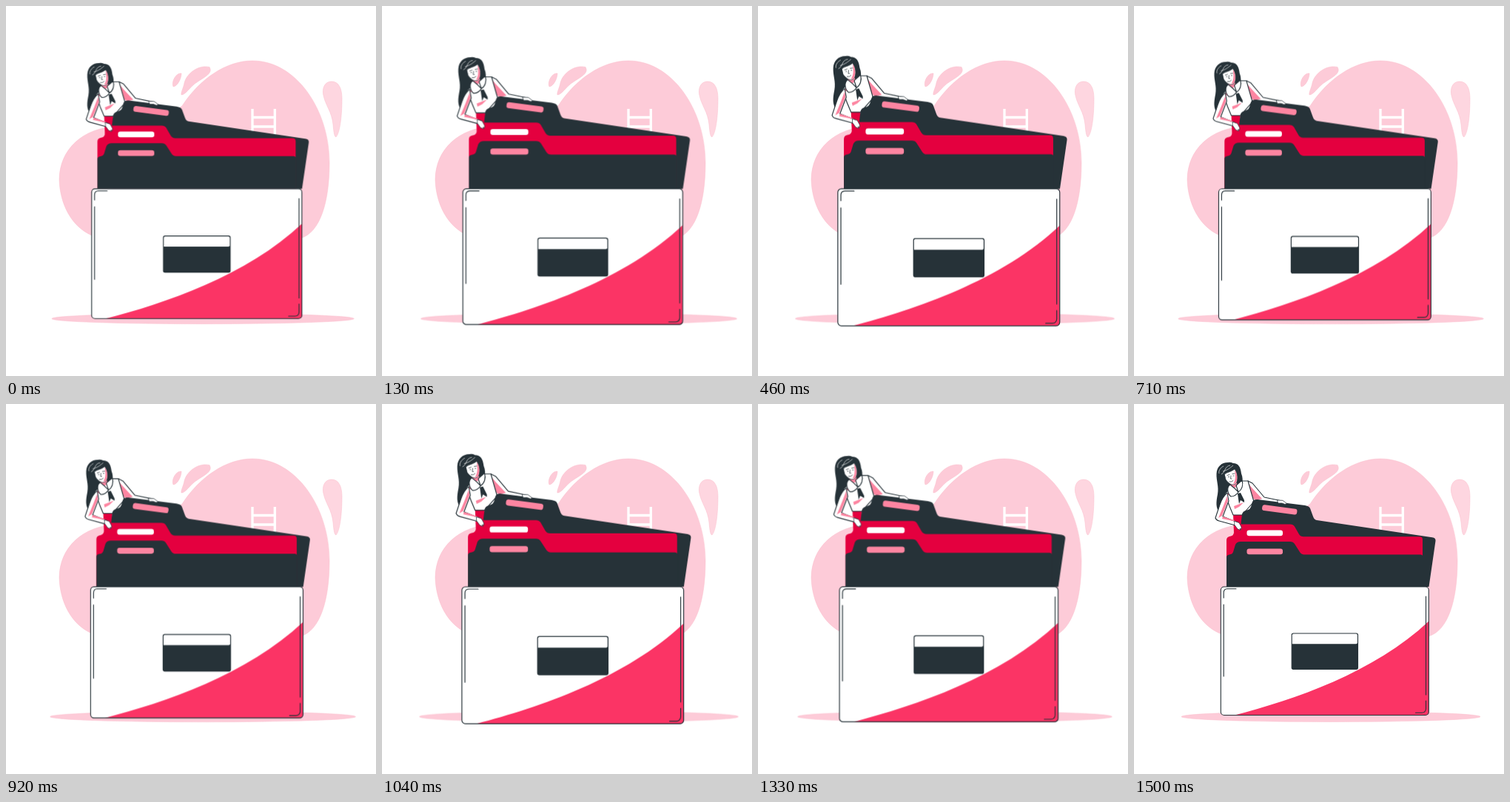
Recreate the animation shown at these times as an HTML page. Size 500 by 500 pixels, loop 1.54 s.

```html
<!DOCTYPE html>
<html lang="en">
<head>
<meta charset="utf-8">
<title>Folder pulse</title>
<style>
  html, body { margin: 0; width: 100%; height: 100%; overflow: hidden; background: #fff; }
  svg { display: block; width: 100%; height: 100%; }

  .pulse { animation: pulse 1540ms linear infinite; }
  .files { transform-origin: 257.75px 247px; }
  .ground { transform-origin: 266px 422.5px; }

  @keyframes pulse {
    0%     { transform: scale(1.0107); }
    8.44%  { transform: scale(1.057); animation-timing-function: cubic-bezier(.39, .575, .565, 1); }
    19.9%  { transform: scale(1.1); animation-timing-function: cubic-bezier(.47, 0, .745, .715); }
    29.87% { transform: scale(1.0675); }
    46.1%  { transform: scale(1.0213); animation-timing-function: cubic-bezier(.39, .575, .565, 1); }
    52.9%  { transform: scale(1); animation-timing-function: cubic-bezier(.47, 0, .745, .715); }
    59.74% { transform: scale(1.0213); }
    70.1%  { transform: scale(1.081); animation-timing-function: cubic-bezier(.39, .575, .565, 1); }
    75.97% { transform: scale(1.0995); animation-timing-function: cubic-bezier(.445, .05, .55, .95); }
    97.4%  { transform: scale(1); animation-timing-function: cubic-bezier(.47, 0, .745, .715); }
    100%   { transform: scale(1.0107); }
  }

  .blush { fill: #fdcbd8; stroke: #fbbccb; stroke-width: .5; }
  .pale { fill: #fed6e0; }
  .dark { fill: #263238; }
  .red { fill: #e4003f; }
  .pink { fill: #fb3465; }
  .tab { fill: #fd85a1; }
  .white { fill: #fff; }
  .line { stroke: #263238; stroke-width: 1.1; stroke-linecap: round; stroke-linejoin: round; }
  .thin { stroke: #263238; stroke-width: .7; stroke-linecap: round; stroke-linejoin: round; }
  .none { fill: none; }
</style>
</head>
<body>
<svg viewBox="0 0 500 500">
  <!-- backdrop -->
  <path class="blush" d="M150 163C104 164 72 194 72 235C73 267 88 298 116 310L240 330L398 314C425 306 437 264 437 212C437 140 392 74 333 74C298 74 262 98 238 135L190 170Z"/>
  <g class="blush">
    <path d="M237 91C230 90 223 102 226 109C231 109 237 99 237 91Z"/>
    <path d="M275 82.500C260 79 244 91 241 104C240 110 236 117 237 120C242 120 246 113 254 106C264 98 278 93 276 85Z"/>
    <path class="pale" d="M440 102C430 102 427 112 429 121C432 135 440 142 442 160C443 172 444 177 446 177C451 172 454 150 454 125C454 112 450 102 440 102Z"/>
  </g>
  <path class="none" stroke="#fff" stroke-width="3.300" d="M333 139V195M363.300 139V195M333 150.500H363M333 163H363"/>

  <ellipse class="blush pulse ground" cx="266" cy="422.500" rx="202" ry="7"/>

  <g class="pulse files">
    <!-- woman -->
    <path class="red" d="M134 148L146 145V168L135 174Z"/>
    <path class="dark" d="M127 79C118 79 112 85 111.500 94C111 104 115 111 113 122C111 132 110 141 116 147C122 141 122 130 126 119L146 108C147 103 147 99 145 94C144 85 141 80 134 80Q130 78 127 79Z"/>
    <path class="white line" d="M154 104L160 107L176 126L200 131L199 136L168 133L157 128Z"/>
    <path class="tab" d="M155 108L160 114L173 128L165 130L158 126Z"/>
    <path class="white line" d="M130 114L123 121L129 138L134 150H146L162 132L154 104L146 104Z"/>
    <path class="tab" d="M135 138L148 133L142 139L136 142ZM128 117L133 124L126 123Z"/>
    <path class="white line" d="M126 120C121 124 118 130 116 136L110 154Q111 157 115 158L137 164L140 160L120 152L128 131Z"/>
    <path class="tab" d="M126 124L127 131L119 151L114 154L121 137ZM120 152L135 157L138 159L119 155Z"/>
    <path class="tab" d="M128 104L138 103L140 111L133 115Z"/>
    <path class="white thin" d="M122.500 95C125 92 131 92 136 88C140 93 141 102 138 107C134 112 127 107 124 102Z"/>
    <path class="tab" d="M136 89C140 94 140.500 103 137 107.500L134 108C138 102 137 96 136 89Z"/>
    <path class="none thin" d="M126 96.500L129 95.500M133 94.500L136 94M131 97L130.500 101H132M129 105Q132 106 134 103.500M127.500 98.500H128.500M134 97H135"/>
    <path class="none" stroke="#fff" stroke-width=".6" d="M130 83C122 84 124 92 118 95M134 83C129 87 127 89 120 91M115 94C114 90 117 86 121 84"/>
    <path class="white line" d="M130 109C125 112 126 121 131 125C136 125 139 122 141 119L136 114ZM141 119C146 116 148 109 146 103L138 110Z"/>
    <path class="dark" d="M140 121L144 120L149 130V133L144 130L142 135Z"/>

    <!-- back folder -->
    <path class="dark" d="M144 166L146 149Q147 145 151 144L154 143Q157 142 158 139L160 132Q162 128.500 167 129L231 137Q237 138 238 141L242 152Q243.500 156.500 247 157L403 180.200Q408 181 407.500 185L398.500 247H144Z"/>
    <rect class="tab" x="173" y="139" width="47.500" height="7.800" rx="3" transform="rotate(7.500 196.700 142.900)"/>

    <!-- red folder -->
    <path class="red" d="M125 247V184Q125 180 129 179L131 178.500Q134 178 135 174L138 166Q140 162.500 145 162.500H211Q215 162.500 217 165.500L223 176Q225 179.300 229 179.300H386Q390 179.300 390 183.500V247Z"/>
    <rect class="white" x="152.500" y="170.600" width="48.500" height="7.600" rx="3"/>

    <!-- front dark folder -->
    <path class="dark" d="M125 247V207Q125 204 129 203.500Q133 203 134 200L137 190Q139 186 144 186H211Q215 186 217 189L224 200Q226 203.400 230 203.400H387Q390 203.400 390.500 206V247Z"/>
    <rect class="tab" x="152.500" y="195.400" width="48.500" height="7.800" rx="3"/>

    <!-- hands -->
    <path class="white thin" d="M136 158.500L142 160.500L145 166V169L143 168.500L144 170.500L140 169L136 163.500Z"/>
    <path class="white thin" d="M194 130L201 130.300L206.500 134.500L204 135.500L200 134L195 134Z"/>

    <!-- box -->
    <rect class="white" x="117.300" y="247" width="281" height="173.500" rx="4.500"/>
    <path class="pink" d="M136 420.500C215 400 325 363 398.300 293.500V416Q398.300 420.500 393.800 420.500Z"/>
    <rect class="none line" x="117.300" y="247" width="281" height="173.500" rx="4.500"/>
    <path class="none line" d="M138 249.800H126Q121.200 250 121.200 255V262M121.200 271V368M394.500 260V393M394.500 401V412Q394 417 389 417.300H380.500"/>

    <!-- label -->
    <rect class="dark line" x="213.200" y="310" width="89.300" height="48.500" rx="2.200"/>
    <path class="white" d="M213.800 324V312.500Q213.800 310.600 215.600 310.600H300Q301.900 310.600 301.900 312.500V322.500Q301.900 324.200 300 324.200H213.800Z"/>
  </g>
</svg>
</body>
</html>
```
